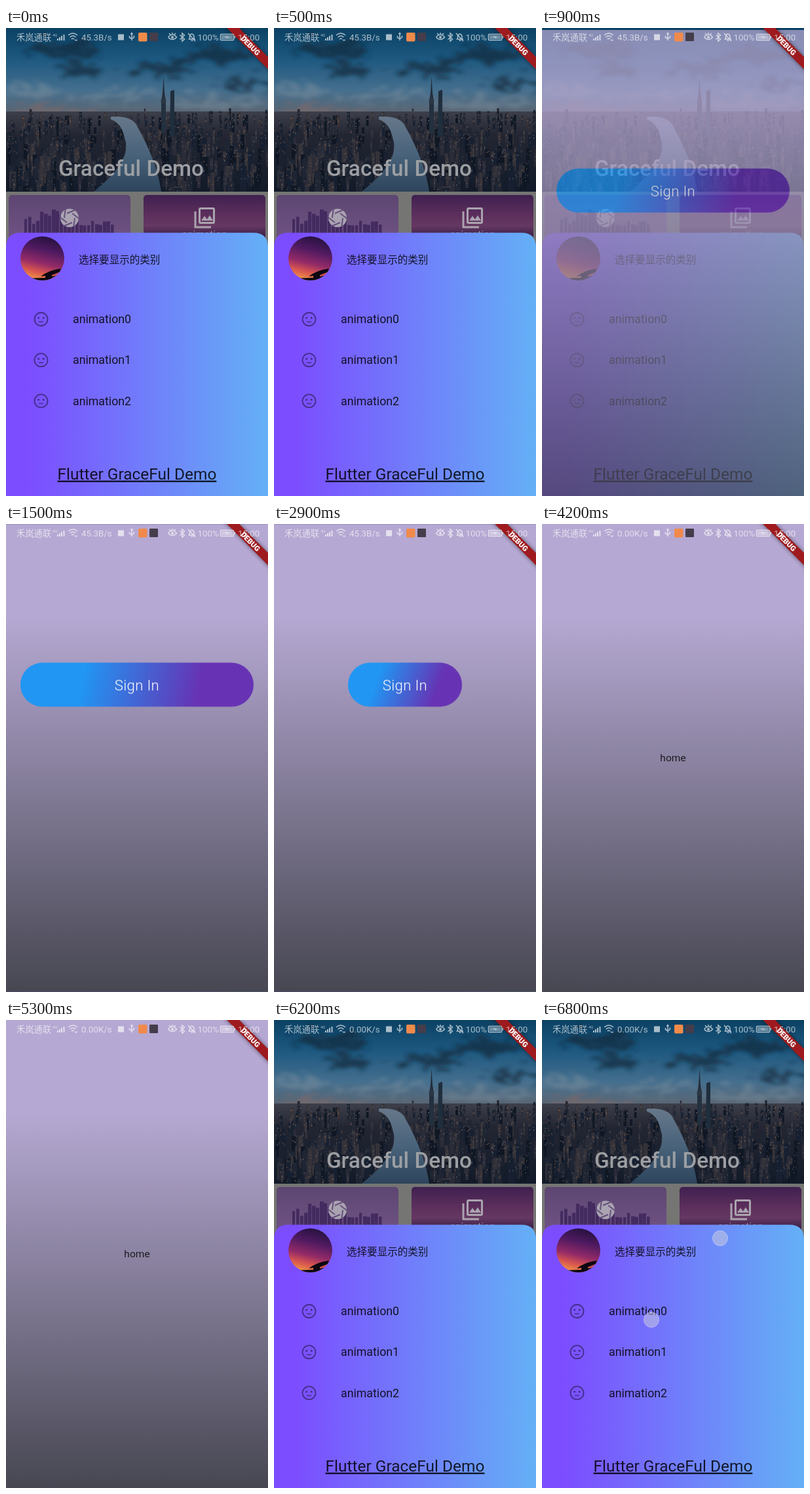
Write an HTML page that moves like this. It is 400 by 712 pixels and loops after 6900 ms.

```html
<!DOCTYPE html>
<html lang="zh-CN">
<head>
<meta charset="utf-8">
<style>
html, body { margin: 0; width: 100%; height: 100%; overflow: hidden; background: #757573 }
#stage { position: relative; width: 400px; height: 712px; overflow: hidden }
#stage > * { position: absolute; left: 0; top: 0; width: 400px; height: 712px }
text, .page { font-family: Roboto, "Noto Sans CJK SC", "Noto Sans CJK", sans-serif }
.page { background: linear-gradient(#b5a8d2 20%, #474752); will-change: transform, opacity }
#btn, #label { position: absolute }
#label { left: 0; width: 400px; top: 231px; line-height: 28px; text-align: center;
  color: #fff; font-size: 22.2px; font-weight: 300; letter-spacing: .3px }
#home { display: flex; align-items: center; justify-content: center; font-size: 15.56px; color: #1d1b22 }
</style>
</head>
<body>
<div id="stage">
<svg id="base" viewBox="0 0 400 712">
  <defs>
    <linearGradient id="sky" x2="0" y2="1">
      <stop stop-color="#0b4163"/><stop offset=".35" stop-color="#1d5880"/>
      <stop offset=".72" stop-color="#456f8e"/><stop offset="1" stop-color="#5c6470"/>
    </linearGradient>
    <linearGradient id="land" x2="0" y2="1">
      <stop stop-color="#3d3f4a"/><stop offset=".3" stop-color="#232632"/><stop offset="1" stop-color="#121a29"/>
    </linearGradient>
    <linearGradient id="river" x2="0" y2="1">
      <stop stop-color="#66788a"/><stop offset=".5" stop-color="#49637b"/><stop offset="1" stop-color="#2d455c"/>
    </linearGradient>
    <linearGradient id="dusk" x2="0" y2="1">
      <stop stop-color="#3f2150"/><stop offset=".35" stop-color="#5d2f5d"/>
      <stop offset=".52" stop-color="#653862"/><stop offset=".7" stop-color="#3c2148"/>
    </linearGradient>
    <linearGradient id="mist" x2="0" y2="1">
      <stop stop-color="#5d4672"/><stop offset="1" stop-color="#755789"/>
    </linearGradient>
    <linearGradient id="sheet">
      <stop offset=".08" stop-color="#7c4dff"/><stop offset="1" stop-color="#64b0f6"/>
    </linearGradient>
    <linearGradient id="sunset" x1=".6" x2=".35" y2="1">
      <stop stop-color="#25123e"/><stop offset=".3" stop-color="#4f1a60"/><stop offset=".6" stop-color="#922a68"/>
      <stop offset=".8" stop-color="#d8554f"/><stop offset="1" stop-color="#f39a45"/>
    </linearGradient>
    <filter id="soft" x="-10%" y="-10%" width="120%" height="120%">
      <feTurbulence baseFrequency=".03 .05" numOctaves="3" seed="4"/>
      <feDisplacementMap in="SourceGraphic" scale="45" xChannelSelector="R" yChannelSelector="G"/>
      <feGaussianBlur stdDeviation="4 2.500"/>
    </filter>
    <clipPath id="photo"><path d="M0 0H400V249H0Z"/></clipPath>
    <clipPath id="round"><circle cx="55.500" cy="350.500" r="33.500"/></clipPath>
    <g id="face" fill="none" stroke="#000" stroke-opacity=".45" stroke-width="1.800">
      <circle r="10"/><path d="M-3.500 4H3.500" stroke-width="1.500"/>
      <g fill="#000" fill-opacity=".45" stroke="none"><circle cx="-3.800" cy="-2" r="1.500"/><circle cx="3.800" cy="-2" r="1.500"/></g>
    </g>
  </defs>
  <path d="M0 0H400V712H0Z" fill="#757573"/>
  <g clip-path="url(#photo)">
    <path d="M0 0H400V132H0Z" fill="url(#sky)"/>
    <g filter="url(#soft)">
      <g fill="#12293c" opacity=".7">
        <ellipse cx="75" cy="22" rx="60" ry="13"/><ellipse cx="110" cy="52" rx="45" ry="9"/>
        <ellipse cx="235" cy="52" rx="45" ry="10"/><ellipse cx="310" cy="30" rx="50" ry="13"/>
        <ellipse cx="365" cy="76" rx="45" ry="7"/>
      </g>
      <g fill="#7d8f9e" opacity=".5">
        <ellipse cx="35" cy="88" rx="55" ry="8"/><ellipse cx="165" cy="95" rx="70" ry="8"/>
        <ellipse cx="310" cy="104" rx="75" ry="6"/>
      </g>
      <ellipse cx="45" cy="119" rx="95" ry="7" fill="#836a68" opacity=".55"/>
    </g>
    <path d="M0 127H400V249H0Z" fill="url(#land)"/>
    <g id="city"></g>
    <path d="M160 135C185 133 198 141 201 151C215 176 232 212 237 249H134C164 225 190 197 182 170C178 151 171 143 160 139Z" fill="url(#river)"/>
    <path d="M240.500 73L242 98L244 112V160H237V112L239 98Z" fill="#23303f"/>
    <circle cx="240.500" cy="111" r="4" fill="#2b3744"/>
    <path d="M251 96L257 94V165H250Z" fill="#1f2e3d"/>
  </g>
  <text x="191" y="224.500" font-size="33.330" font-weight="500" text-anchor="middle" fill="#9c9fa3">Graceful Demo</text>
  <rect x="4" y="254" width="186" height="90" rx="5" fill="url(#mist)"/>
  <rect x="210" y="254" width="186" height="90" rx="5" fill="url(#dusk)"/>
  <g id="skyline" fill="#432b60"></g>
  <g transform="translate(97 289)">
    <circle r="14" fill="#aaa3b1"/>
    <g id="blades" stroke="#65507c" stroke-width="2"></g>
  </g>
  <g fill="none" stroke="#aaa3ae" stroke-width="3">
    <path d="M289 279V303H313"/><rect x="295.500" y="274.500" width="22" height="22" rx="1.500"/>
  </g>
  <path d="M298 293l5-7 4 5 4-6 5 8Z" fill="#aaa3ae"/>
  <text x="303" y="319" font-size="15.500" text-anchor="middle" fill="#9d93a2">animation</text>
  <path d="M0 712V334Q0 311.500 22 311.500H378Q400 311.500 400 334V712Z" fill="url(#sheet)"/>
  <g clip-path="url(#round)">
    <path d="M22 317H89V384H22Z" fill="url(#sunset)"/>
    <path d="M22 381L60 380V377L53 378Q66 368 84 366L82 371L70 376V378L89 374V384H22Z" fill="#0c0710"/>
  </g>
  <g fill="#000" fill-opacity=".83">
    <text x="111" y="357.500" font-size="15.560">选择要显示的类别</text>
    <g id="items" font-size="17.780"></g>
    <text x="200" y="686.500" font-size="24.440" text-anchor="middle" text-decoration="underline">Flutter GraceFul Demo</text>
  </g>
  <g id="touch" fill="#cfd0dc" fill-opacity=".5" stroke="#fff" stroke-opacity=".35">
    <circle cx="272" cy="332" r="11.500"/><circle cx="167" cy="456" r="11.500"/>
  </g>
</svg>
<div id="login" class="page"><div id="btn"></div><div id="label">Sign In</div></div>
<div id="home" class="page">home</div>
<svg viewBox="0 0 400 712">
  <g transform="translate(400 0) rotate(45)">
    <rect x="-70" y="31.100" width="140" height="13.300" fill="#000" style="filter:blur(3px)" opacity=".5"/>
    <rect x="-70" y="31.100" width="140" height="13.300" fill="#9e1a1e"/>
    <text y="41.800" font-size="11.300" font-weight="900" text-anchor="middle" fill="#fff">DEBUG</text>
  </g>
  <g opacity=".64" fill="#fff" font-size="13.300">
    <text x="16" y="18.700">禾岚通联</text>
    <text x="71" y="12.500" font-size="6">4G</text>
    <path d="M78 19v-3h2v3zM81 19v-5h2v5zM84 19v-7h2v7zM87.500 19v-9h2v9z"/>
    <g fill="none" stroke="#fff" stroke-width="1.500">
      <path d="M95 11q7-6 14 0M97.500 14q4.500-4 9 0M100 17q2-2 4 0M105 18.500h4"/>
      <path d="M192 8v11M188.500 12v2.500l3.500 2 3.500-2.500v-2.500M190.500 9.500l1.500-2 1.500 2"/>
      <path d="M247.500 14q6.500-8 13 0q-6.500 7-13 0M249 8l2 2M259 8l-2 2M254 7v2"/>
      <path d="M265.500 10.500l7 6.500-3.500 3V8l3.500 3-7 6.500"/>
      <path d="M279.500 17h8.500l-1-2v-3q-3.500-6-6.500 0v3zM278 8l11 12M282.500 19h3"/>
      <rect x="327.500" y="9.500" width="20" height="9" rx="1"/>
    </g>
    <circle cx="254" cy="14" r="2"/>
    <path d="M171 9.500h9v9h-9zM348.500 12h1.500v4h-1.500z"/>
    <path d="M329 11h17v6h-17z" opacity=".6"/>
    <path d="M333 14l5-2v1.500h4l-5 2.500v-1.500z"/>
    <text id="speed" x="115" y="18.700"></text>
    <text x="292.500" y="18.700">100%</text>
    <text x="354" y="18.700">15:00</text>
  </g>
  <rect x="202" y="7" width="13.500" height="13.500" rx="2" fill="#f08a4b"/>
  <rect x="219" y="7" width="13" height="13" rx="1" fill="#453d4b"/>
</svg>
</div>
<script>
const $ = id => document.getElementById(id);
const clamp = (v, a = 0, b = 1) => Math.min(b, Math.max(a, v));

let seed = 11;
const rnd = (a, b) => a + (b - a) * ((seed = seed * 16807 % 2147483647) / 2147483647);
const rect = (x, y, w, h, fill) =>
  `<rect x="${x.toFixed(1)}" y="${y.toFixed(1)}" width="${w.toFixed(1)}" height="${h.toFixed(1)}"${fill ? ` fill="${fill}"` : ''}/>`;

function drawScene() {
  let city = '', sky = '', blades = '', items = '';
  const walls = ['#172030', '#1f2532', '#2a2c38', '#353339', '#0f1724'];
  for (let i = 0; i < 450; i++) {
    const d = i / 450, x = rnd(-5, 400), w = rnd(2, 4 + 7 * d), h = rnd(4, 12 + 24 * d);
    const y = 133 + 118 * d - h;
    city += rect(x, y, w, h + 8, walls[Math.floor(rnd(0, 5))]);
    for (let n = 0; n < 3; n++)
      city += rect(x + rnd(0, w - 1), y + rnd(2, h), 1, rnd(1, 2), rnd(0, 1) < .65 ? '#7a5a4a' : '#56616c');
  }
  for (let x = 28; x < 165; x += 6)
    sky += rect(x, 312 - rnd(8, 22) - 18 * Math.exp(-(((x - 72) / 28) ** 2)), rnd(4, 6), 45);
  for (let a = 0; a < 360; a += 60)
    blades += `<path d="M-4 -7L8 -12" transform="rotate(${a})"/>`;
  for (let i = 0; i < 3; i++) {
    const y = 443 + 62.2 * i;
    items += `<use href="#face" x="53.500" y="${y}"/><text x="102" y="${y + 6.2}">animation${i}</text>`;
  }
  $('city').innerHTML = city;
  $('skyline').innerHTML = sky;
  $('blades').innerHTML = blades;
  $('items').innerHTML = items;
}

function bezier(x1, y1, x2, y2) {
  const at = (a, b, s) => 3 * a * s * (1 - s) ** 2 + 3 * b * s * s * (1 - s) + s ** 3;
  return t => {
    if (t <= 0 || t >= 1) return clamp(t);
    let lo = 0, hi = 1;
    for (let i = 0; i < 20; i++) {
      const m = (lo + hi) / 2;
      at(x1, x2, m) < t ? lo = m : hi = m;
    }
    return at(y1, y2, lo);
  };
}
const slide = bezier(.4, 0, .2, 1), fade = bezier(.42, 0, 1, 1);

function bounceOut(t) {
  const k = 7.5625;
  if (t < 1 / 2.75) return k * t * t;
  if (t < 2 / 2.75) return k * (t - 1.5 / 2.75) ** 2 + .75;
  if (t < 2.5 / 2.75) return k * (t - 2.25 / 2.75) ** 2 + .9375;
  return k * (t - 2.625 / 2.75) ** 2 + .984375;
}

// Page fades in while rising a quarter of the screen
function showPage(el, p) {
  el.style.visibility = p > 0 ? 'visible' : 'hidden';
  el.style.opacity = fade(p);
  el.style.transform = `translateY(${178 * (1 - slide(p))}px)`;
}

function drawButton(t) {
  const zoom = 1044 * bounceOut(clamp((t - 3200) / 700));
  const w = Math.min(400, 356 - 289 * clamp((t - 2500) / 635) + zoom);
  const h = Math.min(712, 67 + zoom);
  const top = clamp(244.5 - h / 2, 0, 712 - h);
  const angle = 90 + Math.min(29, Math.atan2(h, w) * 180 / Math.PI);
  Object.assign($('btn').style, {
    left: 200 - w / 2 + 'px', top: top + 'px', width: w + 'px', height: h + 'px',
    borderRadius: (zoom < 377 ? 33.5 : 0) + 'px',
    background: `linear-gradient(${angle}deg, #2196f3 27%, #6733b4 76%)`
  });
  $('label').style.opacity = w > 83 && zoom === 0 ? 1 : 0;
}

function frame(now) {
  const t = now % 6900;
  showPage($('login'), t < 4200 ? clamp((t - 650) / 300) : 0);
  showPage($('home'), t < 5000 ? clamp((t - 3890) / 300) : clamp((6200 - t) / 300));
  drawButton(t);
  $('speed').textContent = t < 3200 ? '45.3B/s' : '0.00K/s';
  $('touch').style.visibility = t >= 6750 ? 'visible' : 'hidden';
}

drawScene();
const start = performance.now();
(function loop() {
  frame(performance.now() - start);
  requestAnimationFrame(loop);
})();
</script>
</body>
</html>
```
